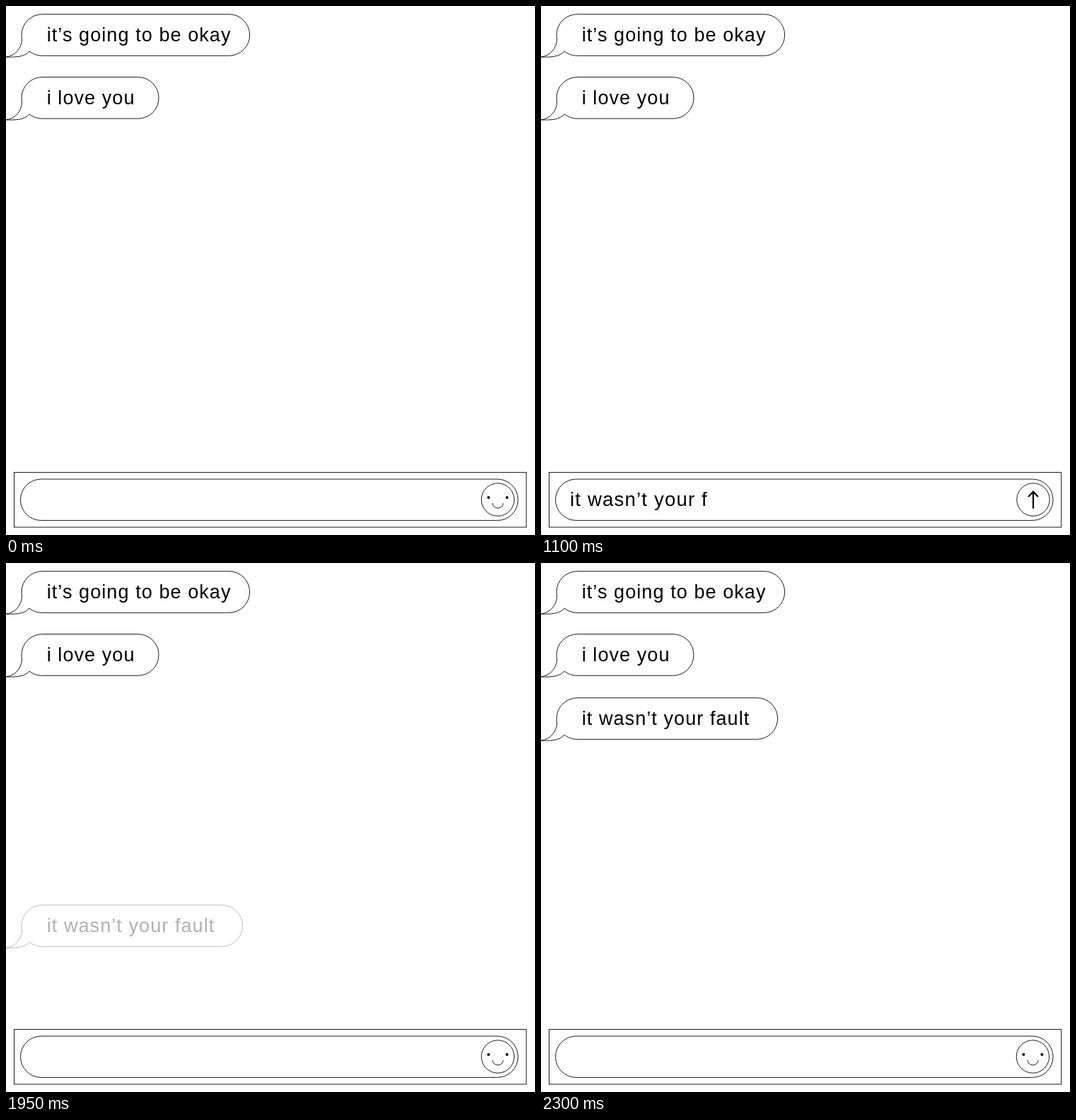
These frames come from a looping animation (748 px wide and 748 px high, 2.35 s). An HTML page:

```html
<!DOCTYPE html>
<html lang="en">
<head>
<meta charset="utf-8">
<title>Chat</title>
<style>
  html, body { margin: 0; width: 100%; height: 100%; overflow: hidden; background: #fff; }
  svg { display: block; width: 100%; height: 100%; }
  text { font: 27px "Liberation Sans", Arial, sans-serif; letter-spacing: 1.08px; white-space: pre; fill: #000; }
  #draft { font-size: 27.5px; letter-spacing: 1.2px; }
  .line { fill: none; stroke: #000; stroke-width: .9; }
  #arrow path { fill: none; stroke: #000; stroke-width: 2.2; }
</style>
</head>
<body>
<svg viewBox="0 0 748 748">
  <g id="bubbles"></g>
  <rect class="line" x="11.5" y="659.4" width="724.2" height="77.6"/>
  <rect class="line" x="20.5" y="669" width="703.5" height="58.4" rx="29.2"/>
  <text id="draft" x="41" y="707"></text>
  <g id="smiley">
    <circle class="line" cx="695.4" cy="698" r="23.2"/>
    <circle cx="682.3" cy="695" r="2"/>
    <circle cx="708.4" cy="695" r="2"/>
    <path class="line" d="M688 703 A7.5 7 0 0 0 703 703"/>
  </g>
  <g id="arrow">
    <circle class="line" cx="696" cy="698" r="23.2"/>
    <path d="M696 710.5 V686.5 M689 694 L696 686.7 L703 694"/>
  </g>
</svg>
<script>
const LOOP = 2350, STEP = 50;
const TYPE_START = 450, SEND = 1500, RISE_START = 1800, RISE_STEPS = 10;
const REST_Y = 190.7, RISE = 418.6;
const message = "it wasn’t your fault";
const get = id => document.getElementById(id);

function addBubble(label, right, y) {
  const group = document.createElementNS("http://www.w3.org/2000/svg", "g");
  group.innerHTML = `
    <path class="line" d="M51.3 0 H${right - 29.3} a29.3 29.3 0 0 1 0 58.6 H51.3
      C44 58.6 37.500 56 33 52.300 C27 60 14 61 0 60.300
      C13 59 22 48 22.600 35.500 Q22 33 22 29.300 A29.3 29.3 0 0 1 51.3 0 Z"/>
    <text x="57.7" y="38.3">${label}</text>`;
  group.setAttribute("transform", `translate(0 ${y})`);
  get("bubbles").append(group);
  return group;
}

addBubble("it’s going to be okay", 344.6, 11.7);
addBubble("i love you", 216, 100.6);
const sent = addBubble(message, 334.6, REST_Y);

// The last two spaces arrive together with the letter that follows.
function typedCount(t) {
  const key = (t - TYPE_START) / STEP;
  return key + 1 + (key >= 9) + (key >= 13);
}

function draw(now) {
  const t = Math.floor(now % LOOP / STEP) * STEP;
  const typing = t >= TYPE_START && t < SEND;
  get("draft").textContent = typing ? message.slice(0, typedCount(t)) : "";
  get("arrow").style.display = typing ? "" : "none";
  get("smiley").style.display = typing ? "none" : "";

  const progress = Math.max(0, (t - RISE_START) / STEP / RISE_STEPS);
  sent.style.opacity = progress;
  sent.setAttribute("transform", `translate(0 ${REST_Y + RISE * (1 - progress)})`);
}

const start = performance.now();
function tick() {
  draw(performance.now() - start);
  requestAnimationFrame(tick);
}
tick();
</script>
</body>
</html>
```
